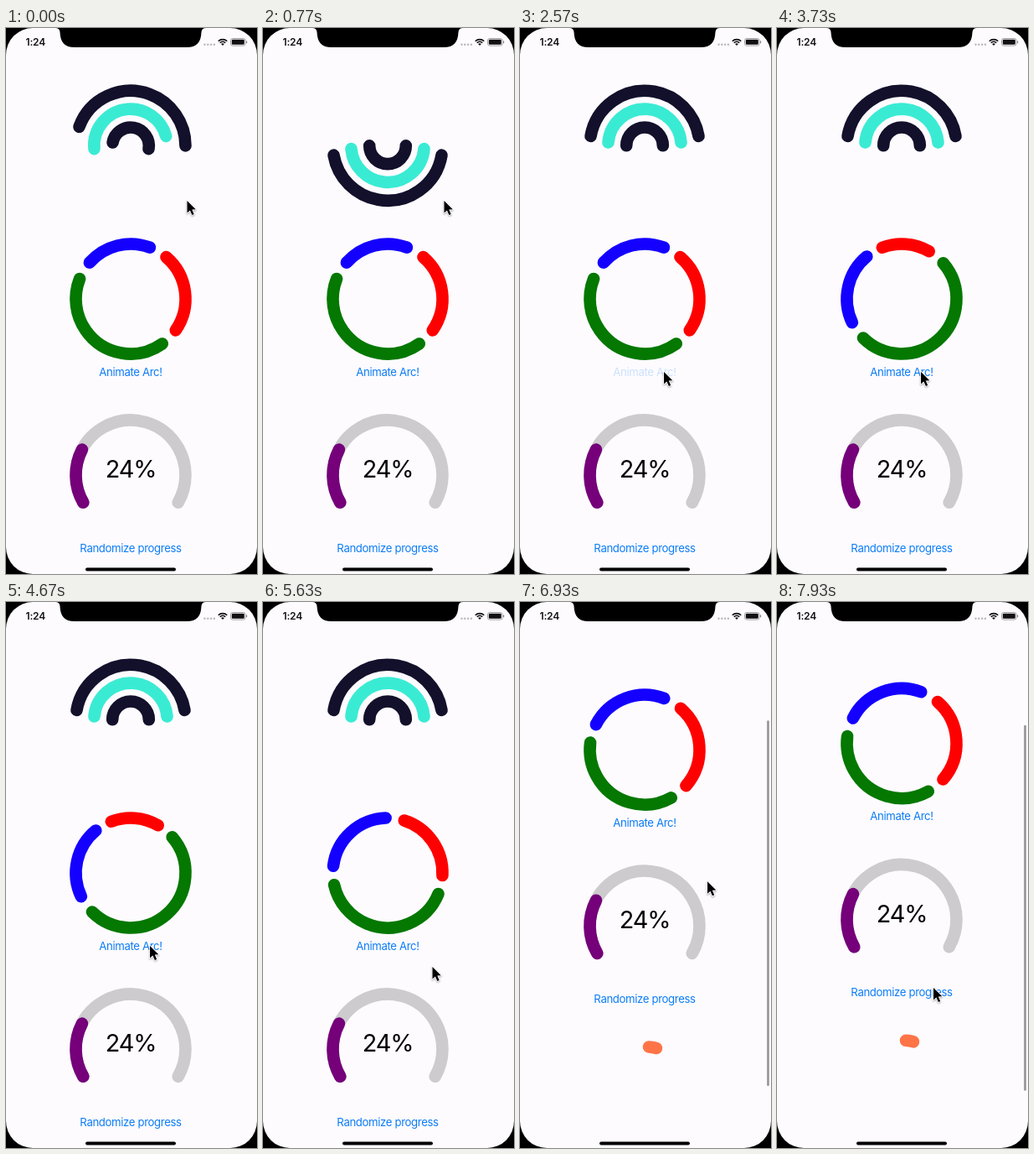
Write an HTML page with a canvas that moves like this. It is 300 by 651 pixels and loops after 8 s.

```html
<!DOCTYPE html>
<html lang="en">
<head>
<meta charset="utf-8">
<title>Arc animations</title>
<style>
html, body { margin: 0; width: 100%; height: 100%; overflow: hidden; background: #000; }
canvas { display: block; width: 300px; height: 651px; }
</style>
</head>
<body>
<canvas id="stage"></canvas>
<script>
const W = 300, H = 651, LOOP = 8000;
const CX = 149, RADIUS = 65.5, STROKE = 14.6;
const PAPER = '#fdfbfe', NAVY = '#13102b', CYAN = '#3aebd3';
const canvas = document.getElementById('stage');
const scale = window.devicePixelRatio || 1;
canvas.width = W * scale;
canvas.height = H * scale;
const ctx = canvas.getContext('2d');

const clamp = v => Math.min(1, Math.max(0, v));
const mix = (a, b, p) => a + (b - a) * p;
const smooth = p => p * p * (3 - 2 * p);
const ramp = (t, start, length) => clamp((t - start) / length);
const ease = (t, start, length) => smooth(ramp(t, start, length));

// Start and end angles in degrees for the blue, red and green arcs
const RING_COLORS = ['#1400ff', '#ff0000', '#047800'];
const RING_POSES = [
  [221.4, 290.5, 310.4, 394.8, 414.8, 561.5],
  [154.6, 230.5, 249.3, 300, 319.3, 494.7],
  [207.3, 290.8, 311, 401, 421, 547.5]
];

// Time, x, y of the pointer tip
const POINTER = [
  [0, 216.5, 206], [1000, 216.5, 206], [1350, 234, 270], [1700, 217, 345],
  [2300, 172, 410], [5200, 172, 410], [5630, 202.5, 435], [6000, 225, 436.5],
  [6150, 225, 436.5], [6600, 225, 330], [6850, 225, 330], [7700, 187, 460], [LOOP, 187, 460]
];

function pointerAt(t) {
  const i = POINTER.findIndex(key => key[0] > t);
  const [t0, x0, y0] = POINTER[i - 1], [t1, x1, y1] = POINTER[i];
  const p = ease(t, t0, t1 - t0);
  return [mix(x0, x1, p), mix(y0, y1, p)];
}

// Drag follows the pointer, then glides to the end of the content
function scrollAt(t) {
  if (t < 6600) return 106.5 * ease(t, 6150, 450);
  return 106.5 + 48 * (1 - Math.exp(-(t - 6600) / 180));
}

function arc(cy, radius, from, to, color) {
  ctx.beginPath();
  ctx.arc(CX, cy, radius, from * Math.PI / 180, to * Math.PI / 180);
  ctx.strokeStyle = color;
  ctx.lineWidth = STROKE;
  ctx.lineCap = 'round';
  ctx.stroke();
}

function label(text, x, y, size, color, spacing, weight = 400) {
  ctx.font = `${weight} ${size}px Inter, Roboto, sans-serif`;
  ctx.letterSpacing = spacing + 'px';
  ctx.textAlign = 'center';
  ctx.fillStyle = color;
  ctx.fillText(text, x, y);
}

function pill(x, y, w, h, r, color) {
  ctx.beginPath();
  ctx.roundRect(x, y, w, h, r);
  ctx.fillStyle = color;
  ctx.fill();
}

function rainbow(t) {
  const turn = 180 * (ease(t, -114, 800) - ease(t, 870, 800));
  arc(140.3, RADIUS, 190 + turn, 350 + turn, NAVY);
  arc(140.3, 43.7, 185 - turn, 355 - turn, CYAN);
  arc(140.3, 21.8, 180 + turn, 360 + turn, NAVY);
}

function ring(t) {
  const first = ease(t, 2650, 1000), second = ease(t, 5050, 1000);
  const angles = RING_POSES[0].map((a, i) =>
    mix(mix(a, RING_POSES[1][i], first), RING_POSES[2][i], second));
  RING_COLORS.forEach((color, i) => arc(323, RADIUS, angles[2 * i], angles[2 * i + 1], color));

  const pressed = [[2500, 2650], [4930, 5050]].map(([down, up]) =>
    t < down ? 0 : 1 - ramp(t, up, 250));
  ctx.globalAlpha = 1 - 0.8 * Math.max(...pressed);
  label('Animate Arc!', CX, 414.8, 13.2, '#0b7cf7', -0.37);
  ctx.globalAlpha = 1;
}

function gauge() {
  arc(533, RADIUS, 150, 390, '#cdcbce');
  arc(533, RADIUS, 150, 150 + 240 * 0.24, '#75007a');
  label('24%', CX, 536.3, 28.8, '#000', -1.1);
  label('Randomize progress', CX, 624.8, 13.2, '#0b7cf7', -0.37);
}

function spinner() {
  ctx.beginPath();
  ctx.moveTo(154, 677.3);
  ctx.quadraticCurveTo(158.5, 677.5, 163, 678.8);
  ctx.strokeStyle = '#ff7447';
  ctx.stroke();
}

function statusBar() {
  label('1:24', 35.3, 21, 12, '#111', -0.2, 600);
  for (let i = 0; i < 4; i++) pill(236.3 + i * 3.8, 18.5, 2.4, 2.4, 1.2, '#b9b7ba');

  // Wi-Fi fan
  ctx.lineCap = 'butt';
  ctx.strokeStyle = ctx.fillStyle = '#111';
  ctx.lineWidth = 1.7;
  for (const r of [4.6, 7.4]) {
    ctx.beginPath();
    ctx.arc(259, 21, r, -Math.PI * 0.75, -Math.PI * 0.25);
    ctx.stroke();
  }
  ctx.beginPath();
  ctx.moveTo(259, 21);
  ctx.arc(259, 21, 2.7, -Math.PI * 0.75, -Math.PI * 0.25);
  ctx.fill();

  // Battery
  ctx.beginPath();
  ctx.roundRect(268.5, 12.5, 17.6, 8.6, 2.4);
  ctx.lineWidth = 0.8;
  ctx.strokeStyle = '#8d8b8e';
  ctx.stroke();
  pill(269.8, 13.8, 15, 6, 1.2, '#111');
  pill(287, 15.3, 1.2, 3, 0.6, '#8d8b8e');
}

function phoneFrame() {
  ctx.fillStyle = '#000';
  ctx.beginPath();
  ctx.rect(0, 0, W, H);
  ctx.roundRect(0, 0, W, H, 32);
  ctx.fill('evenodd');

  ctx.beginPath();
  ctx.moveTo(59, 0);
  ctx.quadraticCurveTo(64, 0, 64.5, 5);
  ctx.bezierCurveTo(65, 17, 70, 23, 82, 23);
  ctx.lineTo(216, 23);
  ctx.bezierCurveTo(228, 23, 233, 17, 233.5, 5);
  ctx.quadraticCurveTo(234, 0, 239, 0);
  ctx.fill();

  pill(95, 643.4, 108, 4, 2, '#000');
}

function pointer(t) {
  const [x, y] = pointerAt(t);
  ctx.save();
  ctx.translate(x, y);
  ctx.beginPath();
  [[0, 0], [0, 14.5], [3.4, 11.4], [5.9, 17], [8.2, 16], [5.8, 10.5], [10.3, 10.3]]
    .forEach(([px, py]) => ctx.lineTo(px, py));
  ctx.closePath();
  ctx.shadowColor = 'rgba(0,0,0,.35)';
  ctx.shadowBlur = 2 * scale;
  ctx.shadowOffsetY = scale;
  ctx.lineWidth = 1.8;
  ctx.lineJoin = 'round';
  ctx.strokeStyle = '#fff';
  ctx.stroke();
  ctx.shadowColor = 'transparent';
  ctx.fillStyle = '#000';
  ctx.fill();
  ctx.restore();
}

function draw(t) {
  const offset = scrollAt(t);
  ctx.setTransform(scale, 0, 0, scale, 0, 0);
  ctx.fillStyle = PAPER;
  ctx.fillRect(0, 0, W, H);

  ctx.save();
  ctx.beginPath();
  ctx.rect(0, 30.5, W, 598.5);
  ctx.clip();
  ctx.translate(0, -offset);
  rainbow(t);
  ring(t);
  gauge();
  spinner();
  ctx.restore();

  ctx.globalAlpha = ramp(t, 6150, 100);
  pill(295.2, 31 + offset * 0.75, 2.6, 436, 1.3, '#969497');
  ctx.globalAlpha = 1;

  statusBar();
  phoneFrame();
  pointer(t);
}

function tick() {
  draw(performance.now() % LOOP);
  requestAnimationFrame(tick);
}
tick();
</script>
</body>
</html>
```
